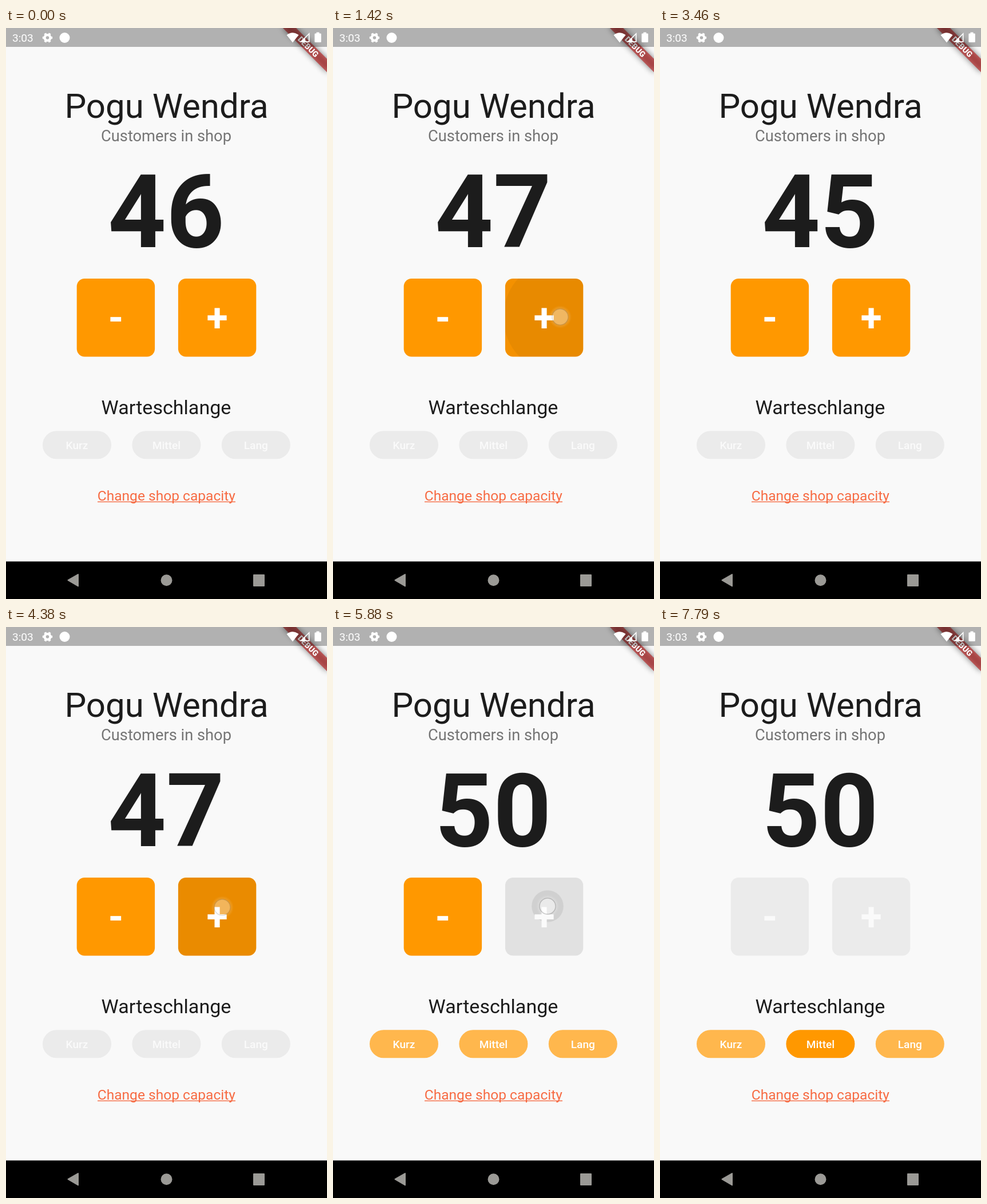
An HTML page that plays this animation: 561 px wide and 998 px high, repeating every 8000 ms.

```html
<!DOCTYPE html>
<html lang="en">
<head>
<meta charset="utf-8">
<title>Customer counter</title>
<style>
  html, body { margin: 0; width: 100%; height: 100%; overflow: hidden; background: #f9f9f9; }
  svg { display: block; width: 561px; height: 998px; font-family: Roboto, "Open Sans", sans-serif; }
  .mid { text-anchor: middle; }
  .ink { fill: #1c1c1c; }
  .sign { font-size: 68.2px; font-weight: 700; }
  .label { font-size: 19.1px; font-weight: 500; }
</style>
</head>
<body>
<svg viewBox="0 0 561 998">
  <defs>
    <filter id="blur" x="-30%" y="-150%" width="160%" height="400%"><feGaussianBlur stdDeviation="5.4"/></filter>
    <radialGradient id="glow">
      <stop offset=".7" stop-color="#fff" stop-opacity="0"/>
      <stop offset=".72" stop-color="#fff" stop-opacity=".25"/>
      <stop offset="1" stop-color="#fff" stop-opacity="0"/>
    </radialGradient>
  </defs>
  <rect width="561" height="998" fill="#f9f9f9"/>

  <text class="mid ink" x="280.5" y="157" font-size="60">Pogu Wendra</text>
  <text class="mid" x="280" y="198" font-size="27.27" fill="#757575">Customers in shop</text>
  <text class="mid ink" id="count" x="280" y="382.8" font-size="177.3" font-weight="700">46</text>
  <g id="buttons"></g>
  <text class="mid ink" x="280" y="675" font-size="34.1">Warteschlange</text>
  <g fill="#f76b43">
    <text class="mid" x="280.3" y="825.5" font-size="24.55">Change shop capacity</text>
    <rect x="160" y="827.5" width="241" height="1.4"/>
  </g>

  <g transform="translate(561 0) rotate(45)">
    <rect x="-54.5" y="38.2" width="109" height="16.4" opacity=".5" filter="url(#blur)"/>
    <rect x="-54.5" y="38.2" width="109" height="16.4" fill="#b71c1c" fill-opacity=".627"/>
    <text class="mid" y="51.3" font-size="13.9" font-weight="900" fill="#fff">DEBUG</text>
  </g>

  <rect width="561" height="33" opacity=".29"/>
  <g fill="#fff">
    <text x="11" y="24" font-size="19.1">3:03</text>
    <g fill="none" stroke="#fff">
      <circle cx="72.5" cy="17" r="4.9" stroke-width="4.2"/>
      <circle cx="72.5" cy="17" r="7.4" stroke-width="2.6" pathLength="12" stroke-dasharray="1 1" stroke-dashoffset=".5"/>
    </g>
    <circle cx="102.5" cy="17" r="9"/>
    <path d="M501 25.5 490.5 12.2Q501 4.5 511.5 12.2Z"/>
    <path d="M515.5 24.2H529.7V10Z" fill="none" stroke="#fff" stroke-width="1.7"/>
    <path d="M514 25 523 16V25Z"/>
    <path d="M542.5 9.5V7.5H547.5V9.5H549.5Q550.8 9.5 550.8 10.8V23.7Q550.8 25 549.5 25H540.7Q539.4 25 539.4 23.7V10.8Q539.4 9.5 540.7 9.5Z"/>
  </g>

  <rect y="932.4" width="561" height="65.6"/>
  <g fill="#9b9a96" stroke="#9b9a96" stroke-width="2" stroke-linejoin="round">
    <path d="M108.5 965.2 126 955V975.5Z"/>
    <circle cx="280.5" cy="965.3" r="9"/>
    <rect x="433" y="956" width="18" height="19"/>
  </g>

  <g id="dot">
    <circle r="20" fill="url(#glow)"/>
    <circle r="14" fill="#fff" fill-opacity=".6" stroke="#777" stroke-opacity=".4" stroke-width="1.5"/>
  </g>
</svg>
<script>
const LOOP = 8000, HOLD = 130, FADE = 200;
const ORANGE = '#ff9800', PALE = '#ffb74d', GREY = '#ebebeb';
const $ = id => document.getElementById(id);
const clamp = v => Math.max(0, Math.min(1, v));

function add(parent, tag, attrs, text) {
  const el = document.createElementNS('http://www.w3.org/2000/svg', tag);
  for (const k in attrs) el.setAttribute(k, attrs[k]);
  if (text) el.textContent = text;
  return parent.appendChild(el);
}

function makeButton(name, x, y, w, h, r, cls, base, text) {
  const box = { x, y, width: w, height: h, rx: r };
  const g = $('buttons');
  const clip = add(g, 'clipPath', { id: 'clip-' + name });
  add(clip, 'rect', box);
  const face = add(g, 'rect', box);
  const ink = add(g, 'g', { 'clip-path': `url(#clip-${name})` });
  const light = add(ink, 'rect', { ...box, opacity: 0 });
  const wave = add(ink, 'circle', { r: 0, opacity: 0 });
  const label = add(g, 'text', { class: 'mid ' + cls, x: x + w / 2, y: base }, text);
  return { x, y, w, h, face, light, wave, label };
}

const square = (name, x, text) =>
  makeButton(name, x, 438, 136.4, 136.4, 13.6, 'sign', 530, text);
const pill = (name, x) =>
  makeButton(name.toLowerCase(), x, 704.2, 120, 49.1, 24.5, 'label', 736, name);

const ui = {
  minus: square('minus', 123.7, '-'),
  plus: square('plus', 300.9, '+'),
  kurz: pill('Kurz', 64),
  mittel: pill('Mittel', 220.4),
  lang: pill('Lang', 376.8)
};

// press time, button, touch point, change of the count
const taps = [
  [1220, 'plus', 397, 505, 1],
  [2030, 'minus', 205, 508, -1],
  [2740, 'minus', 203, 506, -1],
  [3480, 'plus', 380, 494, 1],
  [4170, 'plus', 378, 490, 1],
  [4600, 'plus', 376, 488, 1],
  [5020, 'plus', 375, 487, 1],
  [5740, 'plus', 375, 488, 1],
  [7000, 'mittel', 286, 729, 0]
];

function paint(btn, on, color) {
  btn.face.setAttribute('fill', on ? color : GREY);
  btn.label.setAttribute('fill', on ? '#fff' : '#fafafa');
}

// The wave creeps while held, then runs to the farthest corner and fades.
function press(btn, age, x, y) {
  const after = age - HOLD;
  const far = Math.hypot(Math.max(x - btn.x, btn.x + btn.w - x),
                         Math.max(y - btn.y, btn.y + btn.h - y));
  const held = far * Math.min(age, HOLD) / 1000;
  const fade = 1 - clamp(after / FADE);
  btn.wave.setAttribute('cx', x);
  btn.wave.setAttribute('cy', y);
  btn.wave.setAttribute('r', held + (far - held) * clamp(after / (far / 1.36)));
  btn.wave.setAttribute('opacity', .08 * clamp(age / 75) * fade);
  btn.light.setAttribute('opacity', .065 * clamp(age / 200) * fade);
  $('dot').setAttribute('transform', `translate(${x} ${y})`);
  $('dot').setAttribute('opacity', fade);
}

function draw(t) {
  let count = 46, queued = false;
  $('dot').setAttribute('opacity', 0);
  for (const b of Object.values(ui)) {
    b.wave.setAttribute('opacity', 0);
    b.light.setAttribute('opacity', 0);
  }
  for (const [start, name, x, y, step] of taps) {
    const age = t - start;
    if (age >= HOLD) {
      count += step;
      if (name === 'mittel') queued = true;
    }
    if (age >= 0 && age < HOLD + FADE) press(ui[name], age, x, y);
  }
  const full = count === 50;
  $('count').textContent = count;
  paint(ui.minus, !queued, ORANGE);
  paint(ui.plus, !full, ORANGE);
  paint(ui.kurz, full, PALE);
  paint(ui.mittel, full, queued ? ORANGE : PALE);
  paint(ui.lang, full, PALE);
}

const begin = performance.now();
function tick() {
  draw((performance.now() - begin) % LOOP);
  requestAnimationFrame(tick);
}
tick();
</script>
</body>
</html>
```
